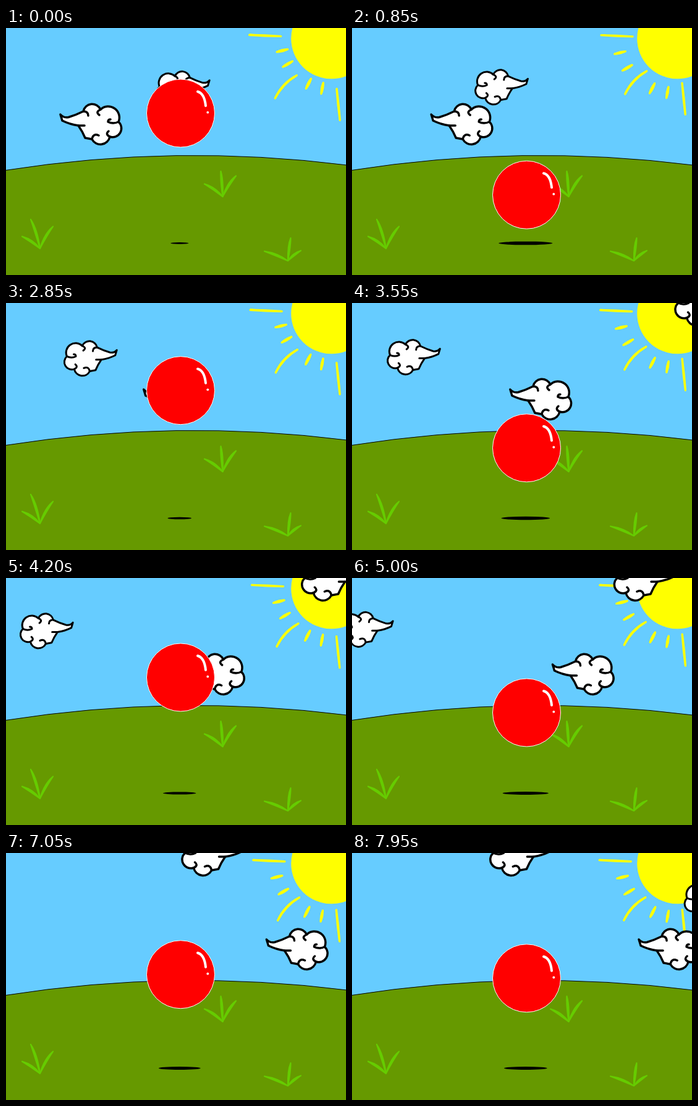
An HTML page that plays this animation: 550 px wide and 400 px high, repeating every 8000 ms.

```html
<!DOCTYPE html>
<html lang="en">
<head>
<meta charset="utf-8">
<title>Bouncing ball</title>
<style>
  html, body { margin: 0; width: 100%; height: 100%; overflow: hidden; background: #6cf; }
  svg { display: block; width: 550px; height: 400px; }
</style>
</head>
<body>
<svg viewBox="0 0 550 400">
  <defs>
    <!-- Origin at the tip of the tail: tail, four lobes, then the curls between them -->
    <g id="cloud" transform="translate(-87 -138)" fill="none" stroke="#000" stroke-width="3.5"
       stroke-linecap="round" stroke-linejoin="round">
      <path fill="#fff" d="M88 140Q93 146 101 144.5Q113 141 125 135A14.8 14.8 0 0 1 153 132
        A18 18 0 0 1 182 152A14.2 14.2 0 0 1 168 176A15.5 15.5 0 0 1 139 180L128 178
        Q124 168 117 158Q103 156 91 150Z"/>
      <path d="M125 135q8 0 8 7M153 132q-9 4 -2 9M182 152q-9 4 -17 0q0 -4 4 -4
        M168 176q-8 -4 -2 -9M139 180q2 -10 11 -6M117 158h10"/>
    </g>
  </defs>

  <rect width="550" height="400" fill="#6cf"/>
  <circle cx="526.5" cy="17" r="65.3" fill="#ff0"/>
  <g id="rays" fill="#ff0" stroke="#ff0"></g>
  <path d="M-1 230.5Q275 187 551 222V402H-1Z" fill="#690" stroke="#000"/>
  <g id="grass" fill="#6c0" stroke="#6c0"></g>
  <g id="clouds"></g>
  <ellipse id="shadow" cx="280.8" cy="348.5"/>
  <g id="ball">
    <circle cx="282.5" r="55" fill="#f00" stroke="#fff"/>
    <path d="M310 -35Q321 -32 323 -12" fill="none" stroke="#fff" stroke-width="4" stroke-linecap="round"/>
    <circle cx="326.3" cy="-1.3" r="1.9" fill="#fff"/>
  </g>
</svg>
<script>
const FRAME = 50, LOOP = 8000, BOUNCE = 30, FALL = 15;
const byId = id => document.getElementById(id);

function add(parent, tag, attrs) {
  const node = document.createElementNS('http://www.w3.org/2000/svg', tag);
  for (const key in attrs) node.setAttribute(key, attrs[key]);
  return byId(parent).appendChild(node);
}

// A brush stroke from the origin to (x,y), bent towards (cx,cy) and swollen in the middle.
function brush(parent, x, y, cx, cy, swell, width) {
  const length = Math.hypot(x, y), nx = -y / length * swell, ny = x / length * swell;
  return add(parent, 'path', {
    d: `M0 0Q${cx + nx} ${cy + ny} ${x} ${y}Q${cx - nx} ${cy - ny} 0 0Z`,
    'stroke-width': width, 'stroke-linejoin': 'round'
  });
}

function tuft(rootX, rootY, ...tips) {
  for (const [x, y] of tips)
    brush('grass', x, y, x * 0.45, y * 0.65, 2.6, 2.2)
      .setAttribute('transform', `translate(${rootX} ${rootY})`);
}
tuft(55, 357, [-29, -19.5], [-15, -47], [21, -35.5]);
tuft(350.5, 273, [-29.5, -20.5], [-3, -41], [21.5, -33.5]);
tuft(456, 377, [-38, -15.5], [4.5, -37], [21, -16.5]);

// Rays fan out evenly; every third is long and moves inwards while the short ones move outwards.
const rays = Array.from({ length: 7 }, (_, i) => {
  const long = i % 3 === 0, length = long ? 51 : 18;
  return {
    node: brush('rays', length, 0, length / 2, i === 3 ? 8 : 0, long ? 0.8 : 1.8, 3.4),
    angle: 182.5 - 16.4 * i,
    radius: long ? 82 : 73,
    drift: long ? -11 : 18 - 2 * i
  };
});

// Tail tip at time 0, speed in px per second; a negative width scale points the tail right.
const cloud = (x, y, vx, vy, scaleX, scaleY) =>
  ({ x, y, vx, vy, scaleX, scaleY, node: add('clouds', 'use', { href: '#cloud' }) });
const clouds = [
  cloud(87, 138, 47.3, 0, 1, 1),
  cloud(330, 83, -52.6, -3, -0.86, 0.86),
  cloud(864, -14, -68, 0, -1, 1),
  cloud(1042, 85, -52.6, -3, -0.86, 0.86)
];

function draw(time) {
  const step = Math.floor(time % LOOP / FRAME), seconds = step * FRAME / 1000;
  const n = step % BOUNCE;
  const drop = n <= FALL ? n / FALL : (BOUNCE - 1 - n) / (BOUNCE - 1 - FALL);
  const place = (node, transform) => node.setAttribute('transform', transform);

  place(byId('ball'), `translate(0 ${138 + 180 * drop * drop})`);
  byId('shadow').setAttribute('rx', 14.5 + 34 * drop);
  byId('shadow').setAttribute('ry', 1.5 + 1.6 * drop);
  for (const { node, angle, radius, drift } of rays)
    place(node, `translate(526.5 17) rotate(${angle}) translate(${radius + drift * drop} 0)`);
  for (const { node, x, y, vx, vy, scaleX, scaleY } of clouds)
    place(node, `translate(${x + vx * seconds} ${y + vy * seconds}) scale(${scaleX} ${scaleY})`);
}

const start = performance.now();
function tick() {
  draw(performance.now() - start);
  requestAnimationFrame(tick);
}
draw(0);
requestAnimationFrame(tick);
</script>
</body>
</html>
```
